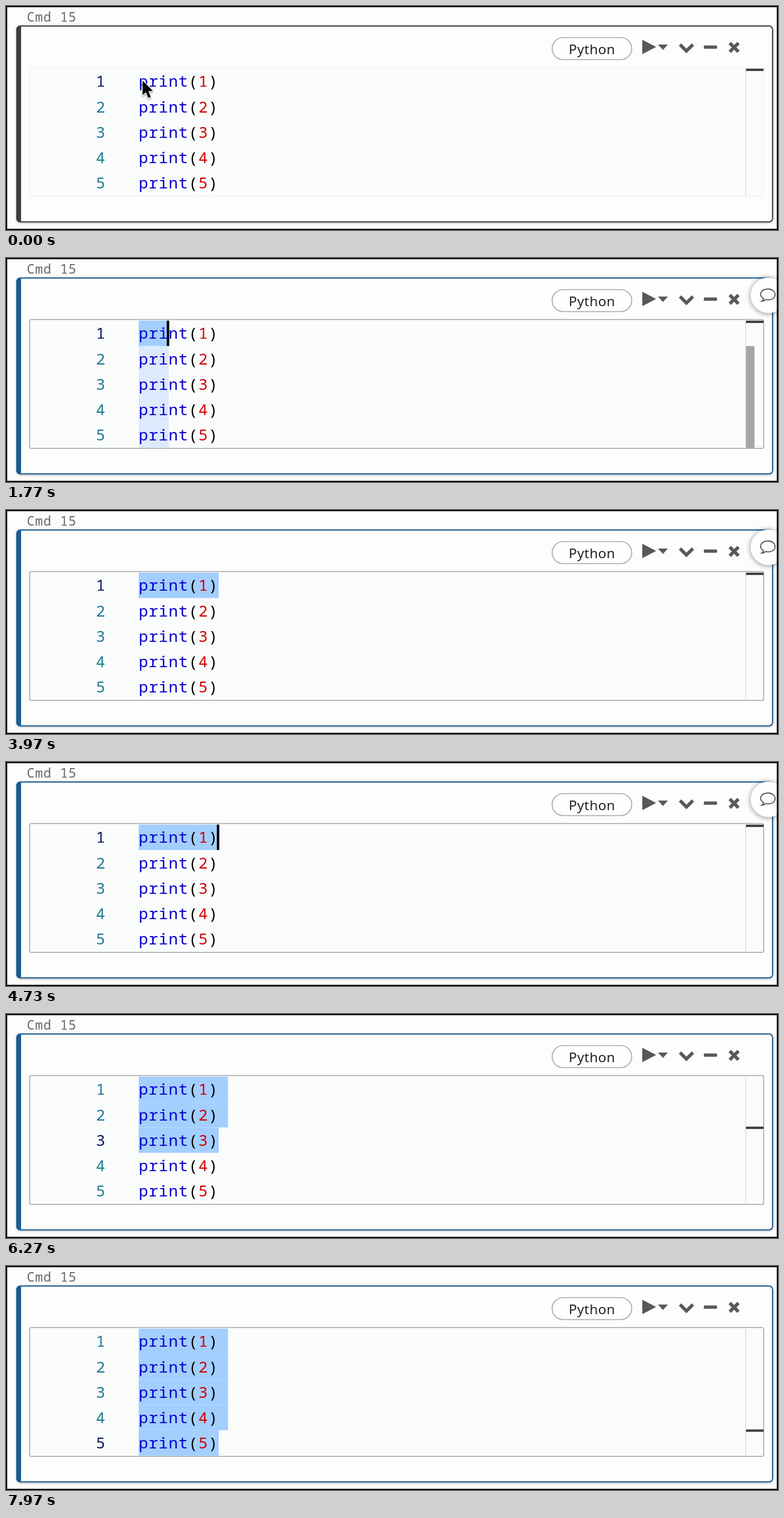
Animation of 1280x372 px, one loop 8 s. Source, as an HTML page:

```html
<!DOCTYPE html>
<html lang="en">
<head>
<meta charset="utf-8">
<title>Notebook cell selection</title>
<style>
  html, body { margin: 0; width: 100%; height: 100%; overflow: hidden; background: #fdfdfd; }
  svg { display: block; width: 1280px; height: 372px; }
  text { white-space: pre; }
  .mono { font-family: "Noto Sans Mono", monospace; font-size: 26px; letter-spacing: .9px; }
  .cmd { font-family: "Noto Sans Mono", monospace; font-size: 21.5px; letter-spacing: .9px; fill: #666; }
  .lang { font-family: "Noto Sans", sans-serif; font-size: 22.5px; letter-spacing: .4px; fill: #222; }
  .fn { fill: #0800cc; }
  .num { fill: #d00000; }
  .line-no { fill: #237893; }
  .line-no.active { fill: #0b1a5e; }
  .cell { color: #3c3c3c; filter: drop-shadow(0 1px 2px #0004); }
  .focus .cell { color: #1b5b91; }
  .editor { fill: #fafcfc; stroke: #f1f2f2; stroke-width: 1.6; }
  .focus .editor { stroke: #a8a8a8; }
  .bubble { filter: drop-shadow(0 1px 4px #0007); }
</style>
</head>
<body>
<svg id="stage" viewBox="0 0 1280 372">
  <rect width="1280" height="372" fill="#fdfdfd"/>
  <text class="cmd" x="34.5" y="26">Cmd 15</text>

  <g class="cell">
    <rect x="18" y="33.2" width="1253" height="325.3" rx="6" fill="#fdfdfd" stroke="currentColor" stroke-width="1.9"/>
    <path d="M25 33V359H23Q17 359 17 352V40Q17 33 23 33Z" fill="currentColor"/>
  </g>

  <rect x="905.5" y="52.5" width="132" height="36.5" rx="18.2" fill="#fefefe" stroke="#aaa" stroke-width="1.6"/>
  <text class="lang" x="971.5" y="79.5" text-anchor="middle">Python</text>
  <g fill="#595959">
    <path d="M1055 56L1078 68L1055 80ZM1081 64H1097.500L1089.200 73Z"/>
    <rect x="1157" y="65.500" width="22" height="5.500" rx="1.500"/>
    <path d="M1117.500 64L1128.200 74.700L1139 64M1200 61.500L1214.500 76M1214.500 61.500L1200 76" fill="none" stroke="#595959" stroke-width="5.400"/>
  </g>

  <rect class="editor" x="39.3" y="102.3" width="1217" height="214" rx="3"/>
  <path d="M1226.500 104V315.500" stroke="#dcdcdc" stroke-width="1.400"/>
  <rect id="matches" x="1227" y="146.300" width="14" height="169.200" fill="#a5a5a5"/>
  <rect id="mark" x="1227" width="29" height="4" fill="#424242"/>

  <g id="selection"></g>
  <g id="code"></g>
  <rect id="caret" width="4" height="42.200"/>

  <g id="bubble" class="bubble">
    <circle cx="1264" cy="62" r="29.500" fill="#fefefe"/>
    <path d="M1256 67.500C1247 62 1251 51.500 1264 51.500C1278 51.500 1280 69.500 1264 69.500Q1261.500 69.500 1259.500 69Q1257 71.500 1253 71.500Q1255.500 70 1256 67.500Z"
      fill="none" stroke="#595959" stroke-width="1.800"/>
  </g>

  <path id="pointer" d="M0 0V24L5.500 19L9.500 28.500L13.500 27L9.500 17.500L17 17Z" stroke="#fff" stroke-width="1.800" paint-order="stroke"
    style="filter:drop-shadow(0 2px 1.500px #0005)"/>

  <path d="M1 1H1279V371H1Z" fill="none" stroke="#000" stroke-width="2"/>
</svg>
<script>
  const LOOP = 8000, FOCUS = 500, DRAG = 1400, BLINK = 500;
  const X = 220, TOP = 104, COL = 16.6, ROW = 42.2, LINES = 5, LEN = 8;

  // Caret stops: time, line, column
  const stops = [
    [FOCUS, 0, 0], [DRAG, 0, 1], [1560, 0, 2], [1720, 0, 3], [1920, 0, 4],
    [2120, 0, 5], [2320, 0, 6], [2530, 0, 7], [3430, 0, 8],
    [4930, 1, 8], [5370, 2, 8], [6900, 3, 8], [7430, 4, 8]
  ];

  const $ = id => document.getElementById(id);
  const show = (el, on) => { el.style.display = on ? "" : "none"; };
  const add = (parent, tag, attrs) => {
    const el = document.createElementNS("http://www.w3.org/2000/svg", tag);
    for (const key in attrs) el.setAttribute(key, attrs[key]);
    return parent.appendChild(el);
  };

  const bars = [], lineNos = [];
  for (let i = 0; i < LINES; i++) {
    const y = TOP + ROW * i, base = y + 30.3;
    bars.push(add($("selection"), "rect", { x: X, y, height: ROW }));
    lineNos.push(add($("code"), "text", { class: "mono line-no", x: 149, y: base }));
    lineNos[i].textContent = i + 1;
    const code = add($("code"), "text", { class: "mono", x: X, y: base });
    for (const [cls, str] of [["fn", "print"], ["", "("], ["num", i + 1], ["", ")"]])
      add(code, "tspan", { class: cls }).textContent = str;
  }

  function draw(t) {
    const [since, line, col] = stops.filter(s => s[0] <= t).pop() || [0, 0, 0];
    const focused = t >= FOCUS;
    const matching = line === 0 && col > 0 && col < 7;

    $("stage").classList.toggle("focus", focused);
    bars.forEach((bar, i) => {
      const cols = i < line ? LEN + 0.92 : i === line || matching ? col : 0;
      bar.setAttribute("width", cols * COL);
      bar.setAttribute("fill", i <= line ? "#a3cfff" : "#dde9fd");
    });
    lineNos.forEach((n, i) => n.classList.toggle("active", i === line));

    const caret = $("caret");
    caret.setAttribute("x", X + (col ? col * COL - 3.2 : 0));
    caret.setAttribute("y", TOP + ROW * line);
    show(caret, focused && Math.floor((t - since) / BLINK) % 2 === 0);

    $("mark").setAttribute("y", TOP + ROW * line - (line ? 1.4 : 0));
    show($("matches"), matching);
    show($("bubble"), line === 0 && col > 0);

    const slide = 2 * Math.min(1, t / FOCUS);
    $("pointer").setAttribute("transform", `translate(${226.5 + slide} ${124 - slide / 4})`);
    show($("pointer"), t < DRAG);
  }

  const start = performance.now();
  function tick() {
    draw((performance.now() - start) % LOOP);
    requestAnimationFrame(tick);
  }
  tick();
</script>
</body>
</html>
```
